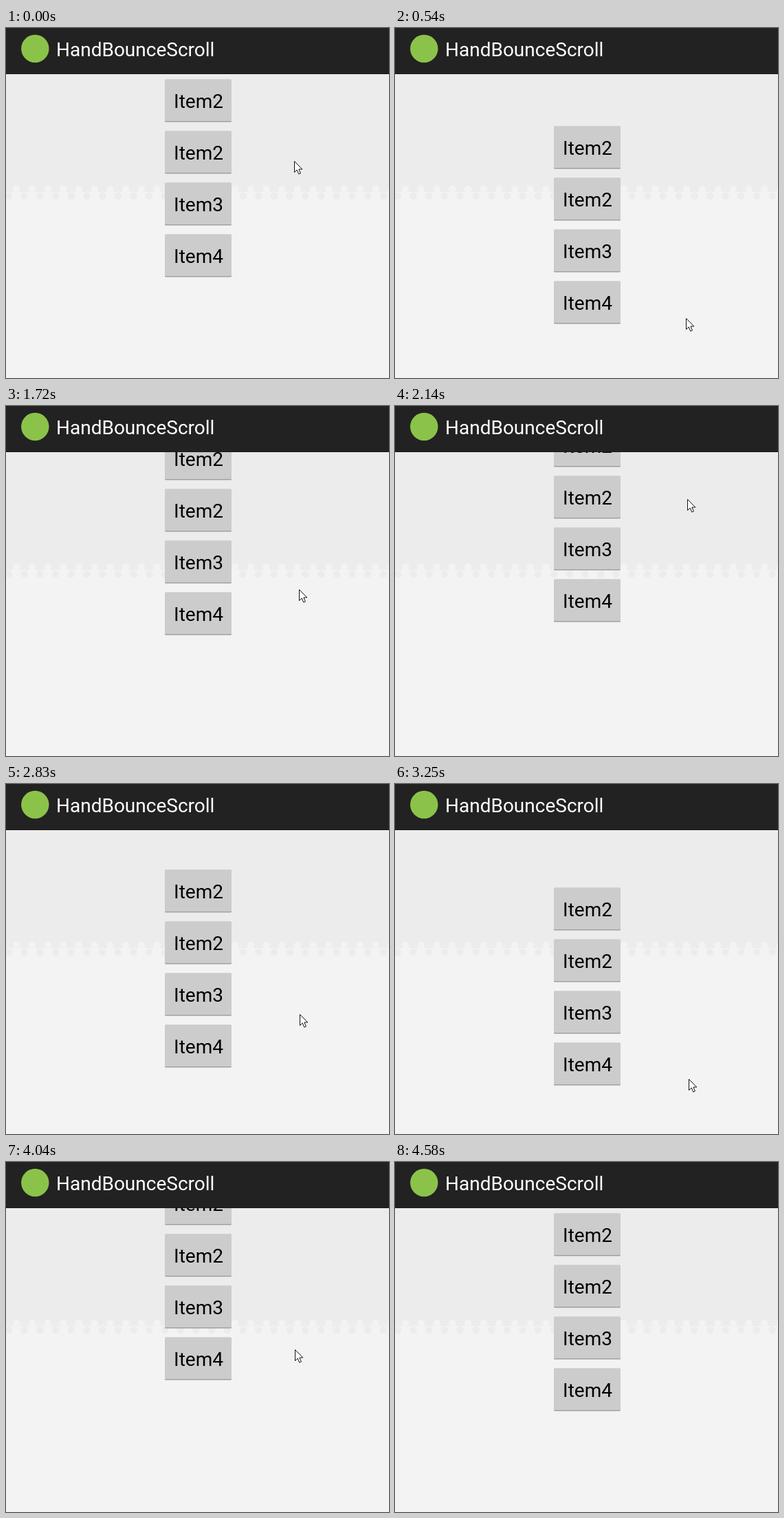
Write an HTML page that moves like this. It is 557 by 508 pixels and loops after 5140 ms.

```html
<!DOCTYPE html>
<html lang="en">
<head>
<meta charset="utf-8">
<title>HandBounceScroll</title>
<style>
  html, body { margin: 0; width: 100%; height: 100%; overflow: hidden; background: #f3f3f3; }
  svg { display: block; width: 557px; height: 508px; }
  text { font: 28px Roboto, "Noto Sans", sans-serif; }
</style>
</head>
<body>
<svg viewBox="0 0 557 508">
  <rect width="557" height="508" fill="#f3f3f3"/>
  <rect width="557" height="238" fill="#ececec"/>
  <g id="dots"></g>
  <g id="list"></g>
  <rect width="557" height="67" fill="#222"/>
  <rect y="66" width="557" height="1" fill="#191919"/>
  <circle cx="42.3" cy="30" r="20.2" fill="#8bc34a"/>
  <text x="73" y="41" fill="#fff">HandBounceScroll</text>
  <path id="cursor" d="M.5 .5V16.5L4.2 13L6.8 19L9.4 17.9L6.9 12H11.8Z"
        fill="#fff" stroke="#101018"/>
</svg>
<script>
const NS = "http://www.w3.org/2000/svg";
const byId = id => document.getElementById(id);

function add(parent, tag, attrs, text) {
  const el = document.createElementNS(NS, tag);
  for (const key in attrs) el.setAttribute(key, attrs[key]);
  if (text) el.textContent = text;
  parent.appendChild(el);
}

const list = byId("list"), dots = byId("dots"), cursor = byId("cursor");

// Dotted border between the two background tones
for (let x = 4; x < 570; x += 22.7) {
  add(dots, "circle", { cx: x, cy: 244, r: 5.2, fill: "#ececec" });
  add(dots, "circle", { cx: x + 11.3, cy: 234, r: 5.2, fill: "#f3f3f3" });
}

["Item2", "Item2", "Item3", "Item4"].forEach((label, i) => {
  const y = 74 + i * 75;
  const bar = (top, bottom, fill) =>
    add(list, "rect", { x: 231, y: y + top, width: 97, height: bottom - top, rx: 1.5, fill });
  bar(1, 62.4, "#a0a0a0");
  bar(0, 61, "#d4d4d4");
  bar(1, 61, "#ccc");
  add(list, "text", { x: 280, y: y + 42, "text-anchor": "middle" }, label);
});

const LOOP = 5140, TICK = 135.5, LEAD = 30;
const PULL = 0.348, MIN_OFFSET = -60, RETURN = 2.5;

// Pointer turning points, times in ticks
const path = [
  { at: 0, x: 419, y: 193 }, { at: 1, x: 419, y: 226 },
  { at: 4, x: 423, y: 421 }, { at: 6, x: 427, y: 452 },
  { at: 8, x: 427, y: 408 }, { at: 10, x: 427, y: 408 },
  { at: 13, x: 425, y: 195 }, { at: 16, x: 425, y: 135 },
  { at: 19, x: 425, y: 154 }, { at: 21, x: 427, y: 334 },
  { at: 23, x: 427, y: 433 }, { at: 26, x: 427, y: 419 },
  { at: 31, x: 418, y: 235 }, { at: 33, x: 553, y: 501 },
  { at: 34, x: 600, y: 600 }
];

// Drags: the list follows from height y until it is let go
const drags = [
  { from: 1, to: 5.5, y: 226 }, { from: 11, to: 15.26, y: 350 },
  { from: 20, to: 23.5, y: 190 }, { from: 27, to: 30.5, y: 400 }
];

function pointer(tick) {
  const i = path.findIndex(p => p.at > tick);
  if (i < 0) return path.at(-1);
  const a = path[i - 1], b = path[i];
  const k = (tick - a.at) / (b.at - a.at);
  return { x: a.x + (b.x - a.x) * k, y: a.y + (b.y - a.y) * k };
}

function listOffset(tick) {
  const drag = drags.findLast(d => d.from <= tick);
  if (!drag) return 0;
  const pulled = PULL * (pointer(Math.min(tick, drag.to)).y - drag.y);
  const back = Math.min(1, Math.max(0, (tick - drag.to) / RETURN));
  return Math.max(MIN_OFFSET, pulled) * (1 + Math.cos(Math.PI * back)) / 2;
}

function place(el, x, y) {
  el.setAttribute("transform", `translate(${Math.round(x)} ${Math.round(y)})`);
}

const start = performance.now();

function draw(now) {
  const t = Math.max(0, now - start) % LOOP;
  const tick = Math.floor((t + LEAD) / TICK);
  const { x, y } = pointer(tick);
  place(list, 0, listOffset(tick));
  place(cursor, x, y);
  requestAnimationFrame(draw);
}
draw(start);
</script>
</body>
</html>
```
